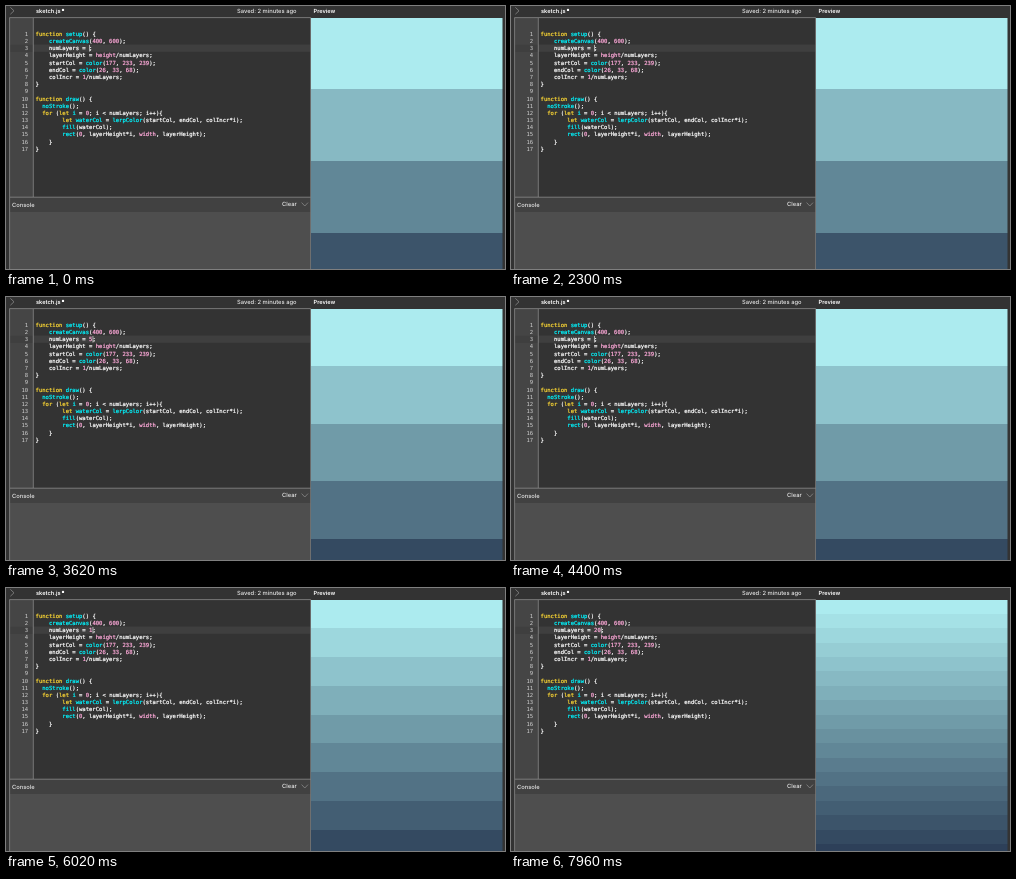
Recreate the animation shown at these times as an HTML page. Size 499 by 263 pixels, loop 8 s.

```html
<!DOCTYPE html>
<html lang="en">
<head>
<meta charset="utf-8">
<title>Layer sketch</title>
<style>
  html, body { margin: 0; width: 100%; height: 100%; overflow: hidden; background: #333; }
  svg { display: block; width: 499px; height: 263px; }
  text { text-rendering: geometricPrecision; white-space: pre; }
  .ui { font: 500 5.8px Inter, sans-serif; fill: #e8e8e8; }
  .strong { font-weight: 600; font-size: 5.65px; fill: #fff; }
  .code { font: 5.565px "DejaVu Sans Mono", monospace; fill: #fdfdfd; stroke: #fdfdfd; stroke-width: .22; }
  .num { fill: #d0d0d0; stroke: none; text-anchor: end; }
  .keyword { fill: #f8d434; stroke: #f8d434; }
  .call, .def { fill: #00f5ff; stroke: #00f5ff; }
  .value, .prop { fill: #ffa9d9; stroke: #ffa9d9; }
  .line { fill: none; stroke: #8a8a8a; stroke-width: .8; }
</style>
</head>
<body>
<svg viewBox="0 0 499 263">
  <rect width="499" height="263" fill="#333"/>
  <rect x="4" y="12" width="23" height="179" fill="#454545"/>
  <rect x="4" y="38.6" width="300.5" height="7.2" fill="#3f3f3f"/>
  <rect x="4" y="191" width="300.5" height="15" fill="#414141"/>
  <rect x="4" y="206" width="300.5" height="57" fill="#4e4e4e"/>
  <path class="line" d="M3.6 263V11.6H304.7V263M27.3 12V191M4 191.2H304.7"/>
  <path class="line" d="M4.4 1.4L8 4.8L4.4 8.2M295.6 196.6L298.8 200L302 196.6"/>
  <text class="ui strong" x="30" y="7.2">sketch.js</text>
  <circle cx="57" cy="3.9" r="1.2" fill="#fff"/>
  <text class="ui" x="231" y="7.2">Saved: 2 minutes ago</text>
  <text class="ui strong" x="307.5" y="7.2">Preview</text>
  <text class="ui" x="6" y="200.6">Console</text>
  <text class="ui" x="276" y="200.3">Clear</text>
  <g id="code"></g>
  <rect id="cursor" y="38.9" width=".8" height="6.6" fill="#ccc"/>
  <g id="preview" shape-rendering="crispEdges"></g>
  <rect x="496.5" y="11" width="2.5" height="252" fill="#333"/>
</svg>
<script>
const LOOP = 8000, BLINK = 530;
const CHAR = 3.35, LEFT = 29.6, TOP = 29.8, LEADING = 7.19;
const START = [172, 235, 239], END = [22, 34, 62];

const source = `function setup() {
    createCanvas(400, 600);
    numLayers = @;
    layerHeight = height/numLayers;
    startCol = color(177, 233, 239);
    endCol = color(26, 33, 68);
    colIncr = 1/numLayers;
}

function draw() {
  noStroke();
  for (let i = 0; i < numLayers; i++){
        let waterCol = lerpColor(startCol, endCol, colIncr*i);
        fill(waterCol);
        rect(0, layerHeight*i, width, layerHeight);
    }
}`;

// [time, text between "=" and ";"]
const edits = [[-510, ""], [450, "4"], [1790, ""], [2480, "5"], [3880, ""],
  [4420, "1"], [4560, "10"], [6020, "1"], [6080, ""], [6380, "2"], [6480, "20"]];
// [time, visible layers], 0 while the preview reloads
const runs = [[0, 4], [810, 0], [1050, 4], [2840, 0], [3080, 5],
  [4920, 0], [5160, 10], [6840, 0], [7080, 20]];

const byId = id => document.getElementById(id);

function add(parent, tag, attrs, text) {
  const el = document.createElementNS("http://www.w3.org/2000/svg", tag);
  for (const k in attrs) el.setAttribute(k, attrs[k]);
  if (text !== undefined) el.textContent = text;
  return parent.appendChild(el);
}

function kind(token, before) {
  if (/^(function|for|let)$/.test(token)) return "keyword";
  if (/^(setup|draw|createCanvas|color|noStroke|lerpColor|fill|rect)$/.test(token)) return "call";
  if (/^(height|width)$/.test(token)) return "prop";
  if (/^(\d+|@)$/.test(token)) return "value";
  return /let $/.test(before) ? "def" : "";
}

let valueSpan;
source.split("\n").forEach((line, row) => {
  const y = TOP + row * LEADING;
  add(byId("code"), "text", { class: "code num", x: 22.2, y }, row + 1);
  const text = add(byId("code"), "text", { class: "code", x: LEFT, y });
  let before = "";
  for (const token of line.match(/\w+|@|[^\w@]+/g) || []) {
    const span = add(text, "tspan", { class: kind(token, before) }, token);
    if (token === "@") valueSpan = span;
    before += token;
  }
});

const at = (list, t) => list.filter(e => e[0] <= t).pop();

let shown = -1;
function drawLayers(count) {
  if (count === shown) return;
  shown = count;
  const preview = byId("preview"), h = 287.5 / count;
  preview.replaceChildren();
  for (let i = 0; i < count; i++) {
    const rgb = START.map((c, k) => Math.round(c + (END[k] - c) * i / count));
    add(preview, "rect", { x: 305, y: 11.5 + i * h, width: 192, height: h, fill: `rgb(${rgb})` });
  }
}

function render(t) {
  const [since, value] = at(edits, t);
  if (valueSpan.textContent !== value) valueSpan.textContent = value;
  const cursor = byId("cursor");
  cursor.setAttribute("x", LEFT + CHAR * (16 + value.length));
  cursor.setAttribute("opacity", Math.floor((t - since) / BLINK) % 2 ? 0 : 1);
  drawLayers(at(runs, t)[1]);
}

const begin = performance.now();
function tick() {
  render((performance.now() - begin) % LOOP);
  requestAnimationFrame(tick);
}
tick();
</script>
</body>
</html>
```
